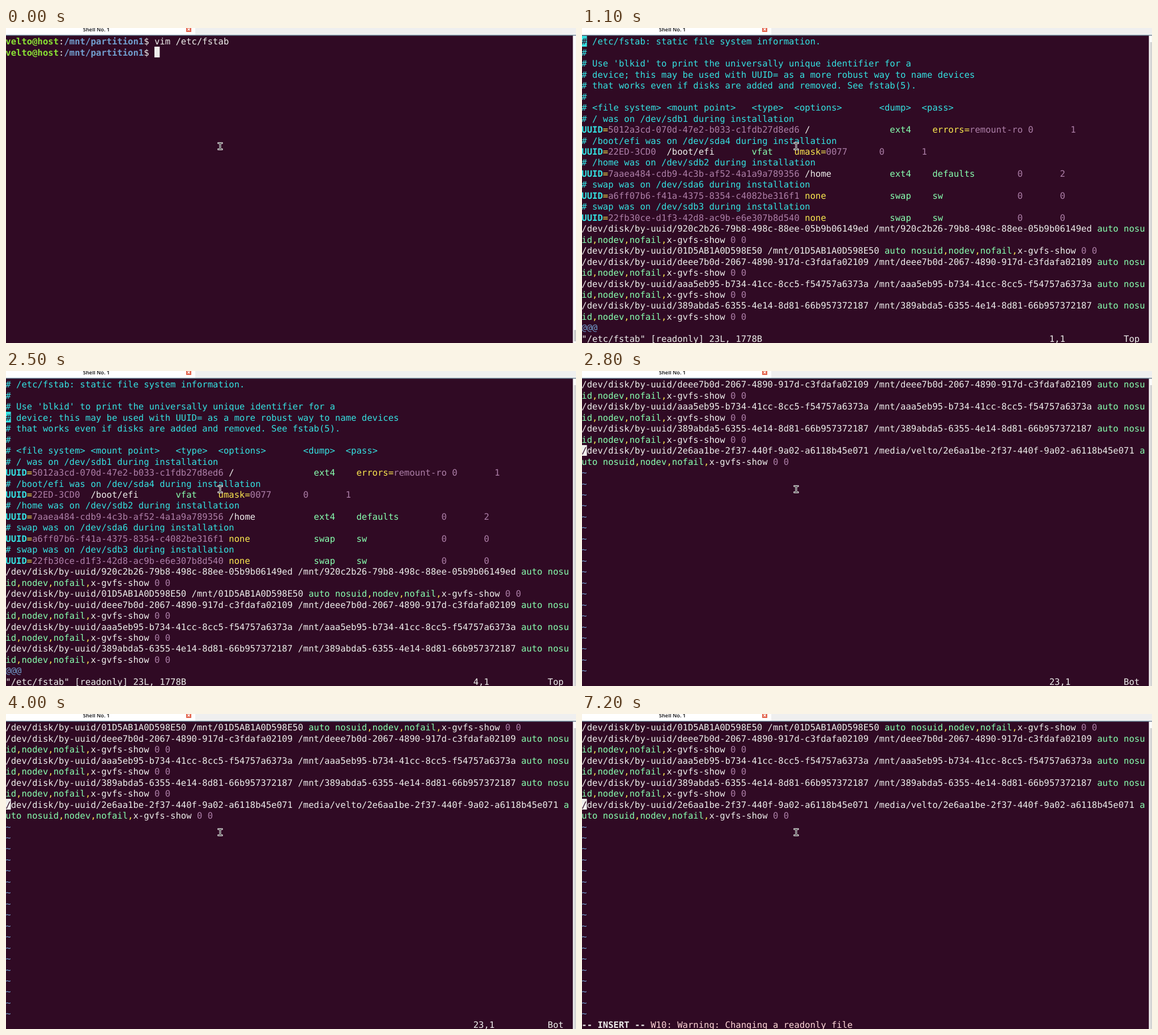
An HTML page with a canvas for the animation above (8 s loop, 1006 px wide and 557 px high).

```html
<!DOCTYPE html>
<html lang="en">
<head>
<meta charset="utf-8">
<title>Editing fstab</title>
<style>
  html, body { margin: 0; width: 100%; height: 100%; overflow: hidden; background: #300a24; }
  canvas { display: block; }
</style>
</head>
<body>
<canvas id="stage" width="1006" height="557"></canvas>
<script>
const ctx = document.getElementById('stage').getContext('2d');
const LOOP = 8000, COLS = 106, ROWS = 28;
const CELL_W = 9.38, CELL_H = 19.46, LEFT = -0.7, TOP = 14, BASELINE = 15.4;
const FONT = '15.58px "DejaVu Sans Mono", monospace';
const BACK = '#300a24', WHITE = '#eeeeec', CYAN = '#34e2e2', YELLOW = '#fce94f',
  PURPLE = '#ad7fa8', GREEN = '#87ffaf', BLUE = '#729fcf', LIME = '#8ae234', PINK = '#ffd7d7';

const diskLine = (id, mount = '/mnt/') =>
  `/dev/disk/by-uuid/${id} ${mount}${id} auto nosuid,nodev,nofail,x-gvfs-show 0 0`;

const FSTAB = [
  '# /etc/fstab: static file system information.',
  '#',
  "# Use 'blkid' to print the universally unique identifier for a",
  '# device; this may be used with UUID= as a more robust way to name devices',
  '# that works even if disks are added and removed. See fstab(5).',
  '#',
  '# <file system> <mount point>   <type>  <options>       <dump>  <pass>',
  '# / was on /dev/sdb1 during installation',
  'UUID=5012a3cd-070d-47e2-b033-c1fdb27d8ed6 /               ext4    errors=remount-ro 0       1',
  '# /boot/efi was on /dev/sda4 during installation',
  'UUID=22ED-3CD0  /boot/efi       vfat    umask=0077      0       1',
  '# /home was on /dev/sdb2 during installation',
  'UUID=7aaea484-cdb9-4c3b-af52-4a1a9a789356 /home           ext4    defaults        0       2',
  '# swap was on /dev/sda6 during installation',
  'UUID=a6ff07b6-f41a-4375-8354-c4082be316f1 none            swap    sw              0       0',
  '# swap was on /dev/sdb3 during installation',
  'UUID=22fb30ce-d1f3-42d8-ac9b-e6e307b8d540 none            swap    sw              0       0',
  diskLine('920c2b26-79b8-498c-88ee-05b9b06149ed'),
  diskLine('01D5AB1A0D598E50'),
  diskLine('deee7b0d-2067-4890-917d-c3fdafa02109'),
  diskLine('aaa5eb95-b734-41cc-8cc5-f54757a6373a'),
  diskLine('389abda5-6355-4e14-8d81-66b957372187'),
  diskLine('2e6aa1be-2f37-440f-9a02-a6118b45e071', '/media/velto/'),
];

// Splits a line into [text, colour, bold] runs.
function highlight(line) {
  if (line[0] === '#') return [[line, CYAN]];
  let field = 0;
  return line.match(/\s+|\S+/g).flatMap(word => {
    if (!word.trim()) return [[word, WHITE]];
    const index = field++;
    if (index === 0 && word.startsWith('UUID='))
      return [['UUID', CYAN, true], ['=', YELLOW], [word.slice(5), PURPLE]];
    if (index < 2) return [[word, word === 'none' ? YELLOW : WHITE]];
    return word.match(/,|\w+=|[^,=]+/g).map(part => [part,
      /[,=]/.test(part) ? YELLOW :
      /^\d+$|^remount/.test(part) ? PURPLE :
      part.startsWith('x-') ? WHITE : GREEN]);
  });
}

const toCells = runs => runs.flatMap(([text, color, bold]) =>
  [...text].map(char => ({ char, color, bold })));

const STATES = [
  { at: 0, shell: '' },
  { at: 700, shell: 'vim /etc/fstab ' },
  { at: 1100, first: 1, line: 1, opened: true },
  { at: 1900, first: 1, line: 2, opened: true },
  { at: 2400, first: 1, line: 3, opened: true },
  { at: 2500, first: 1, line: 4, opened: true },
  { at: 2800, first: 20, line: 23 },
  { at: 3800, first: 19, line: 22 },
  { at: 4000, first: 19, line: 23 },
  { at: 6200, first: 19, line: 23, insert: true, blink: true },
  { at: 7200, first: 19, line: 23, insert: true },
];

function rect(x, y, w, h, color) {
  ctx.fillStyle = color;
  ctx.fillRect(x, y, w, h);
}

function drawCell(row, col, { char, color, bold }) {
  if (char === ' ') return;
  ctx.font = (bold ? 'bold ' : '') + FONT;
  ctx.fillStyle = color;
  ctx.fillText(char, LEFT + col * CELL_W, TOP + row * CELL_H + BASELINE);
}

function put(row, col, ...runs) {
  toCells(runs).forEach((cell, i) => drawCell(row, col + i, cell));
}

function drawCursor(row, col, cell = { char: ' ', color: WHITE }) {
  const y = Math.round(TOP + row * CELL_H);
  rect(LEFT + col * CELL_W, y, CELL_W, 19, cell.color);
  drawCell(row, col, { ...cell, color: BACK });
}

function drawShell(command) {
  const prompt = [['velto@host', LIME, true], [':', WHITE], ['/mnt/partition1', BLUE, true], ['$ ', WHITE]];
  put(0, 0, ...prompt, ['vim /etc/fstab', WHITE]);
  put(1, 0, ...prompt, [command, WHITE]);
  drawCursor(1, 28 + command.length);
}

function drawEditor({ first, line, opened, insert, blink }) {
  let row = 0;
  for (let n = first; n <= FSTAB.length; n++) {
    const cells = toCells(highlight(FSTAB[n - 1]));
    const height = Math.ceil(cells.length / COLS);
    if (row + height > ROWS - 1) break;
    cells.forEach((cell, i) => drawCell(row + Math.floor(i / COLS), i % COLS, cell));
    if (n === line && !blink) drawCursor(row, 0, cells[0]);
    row += height;
  }
  for (; row < ROWS - 1; row++) put(row, 0, [opened ? '@@@' : '~', BLUE]);

  if (insert) {
    put(27, 0, ['-- INSERT -- ', WHITE, true], ['W10: Warning: Changing a readonly file', PINK]);
    return;
  }
  if (opened) put(27, 0, ['"/etc/fstab" [readonly] 23L, 1778B', WHITE]);
  put(27, 88, [`${line},1`, WHITE]);
  put(27, 102, [opened ? 'Top' : 'Bot', WHITE]);
}

function drawWindow(inShell) {
  rect(0, 0, 1006, 12, '#efefef');
  rect(0, 0, 334, 12, '#ffffff');
  rect(0, 12, 1006, 1.5, '#7c9aa9');
  ctx.font = 'bold 9px "Open Sans", "Noto Sans", sans-serif';
  ctx.fillStyle = '#333333';
  ctx.fillText('Shell No. 1', 136, 5.5);
  rect(318, -2, 9, 9, '#e2614a');
  ctx.strokeStyle = '#ffffff';
  ctx.lineWidth = 1.3;
  ctx.stroke(new Path2D('M320.5 0.5l4 4m0-4l-4 4'));

  rect(1000.5, 13.5, 5.5, 544, '#fafafa');
  if (inShell) rect(1002.5, 534, 3.5, 20, '#c8c8c8');
  else rect(1002.5, 25, 3.5, 532, '#d4d4d4');
}

function drawPointer() {
  const beam = new Path2D('M375 203.5h2.2l.8.8l.8-.8h2.2M378 204v10M375 214.5h2.2l.8-.8l.8.8h2.2');
  ctx.lineCap = 'square';
  ctx.lineWidth = 3;
  ctx.strokeStyle = '#ffffff';
  ctx.stroke(beam);
  ctx.lineWidth = 1.1;
  ctx.strokeStyle = '#111111';
  ctx.stroke(beam);
  ctx.lineCap = 'butt';
}

const start = performance.now();
function frame() {
  const time = (performance.now() - start) % LOOP;
  const state = STATES.findLast(({ at }) => at <= time);
  const inShell = state.shell !== undefined;
  ctx.textRendering = 'geometricPrecision';
  rect(0, 0, 1006, 557, BACK);
  if (inShell) drawShell(state.shell);
  else drawEditor(state);
  drawWindow(inShell);
  drawPointer();
  requestAnimationFrame(frame);
}
frame();
</script>
</body>
</html>
```
